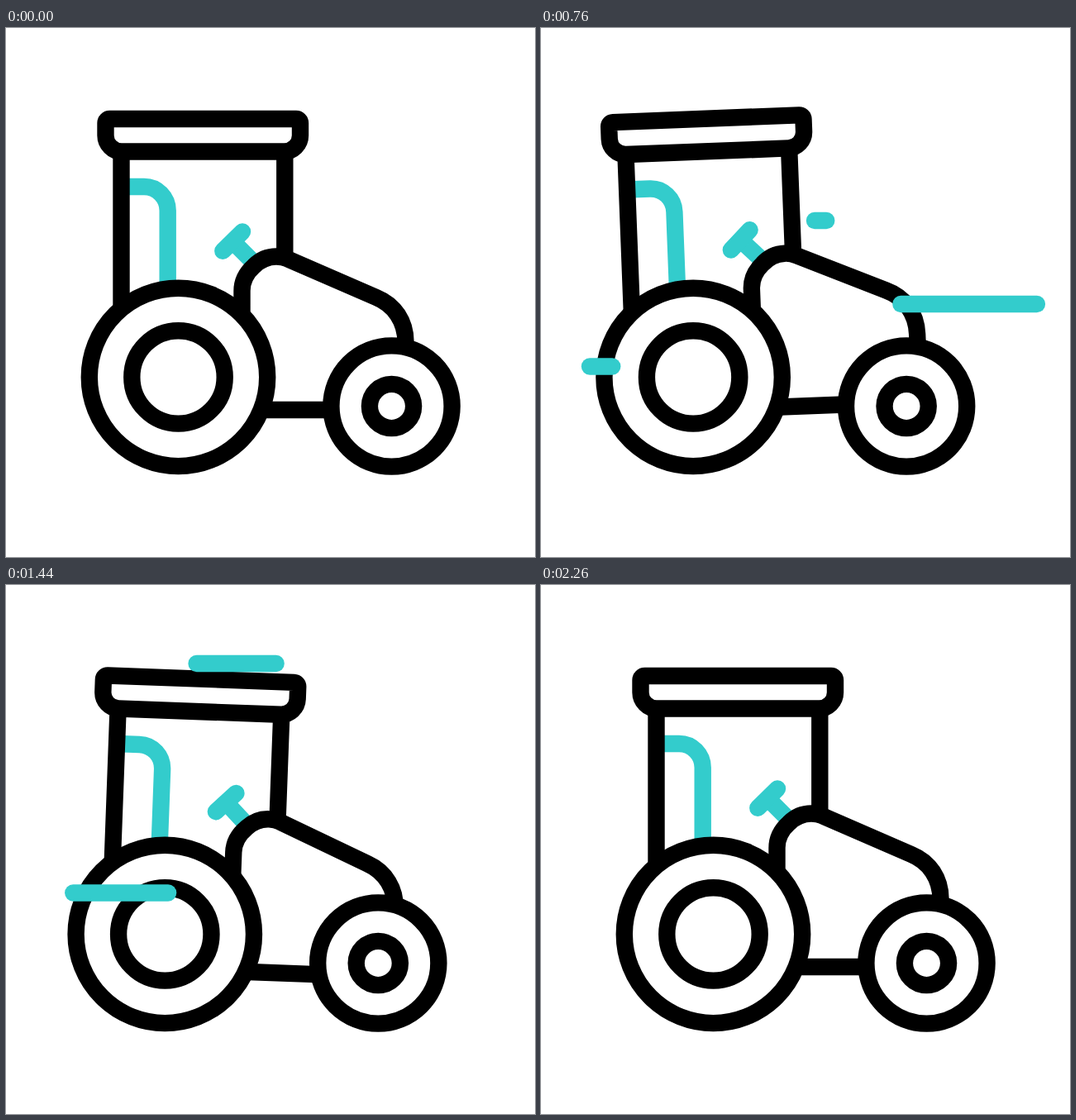
Write an HTML page that moves like this. It is 640 px wide and 640 px high and loops after 2400 ms.

```html
<!DOCTYPE html>
<html lang="en">
<head>
<meta charset="utf-8">
<title>Tractor</title>
<style>
  html, body { margin: 0; width: 100%; height: 100%; overflow: hidden; background: #fff; }
  svg { display: block; width: 100%; height: 100%; }
  .ink { fill: none; stroke: #000; stroke-width: 20.4; }
  .teal { fill: none; stroke: #33cccc; stroke-width: 20.4; }
  .round { stroke-linecap: round; }
  .wheel { fill: #fff; stroke: #000; stroke-width: 20.4; }
</style>
</head>
<body>
<svg viewBox="0 0 640 640" xmlns="http://www.w3.org/2000/svg">
  <rect width="640" height="640" fill="#fff"/>
  <g id="body">
    <path class="teal" d="M140 192H167C183 192 195.7 205 195.7 221V330"/>
    <path class="teal" d="M274 258L298 282"/>
    <path class="teal round" d="M262.3 269.8L286 246.5"/>
    <path class="ink" d="M139.5 150V345M337.3 150V279M295 462H405"/>
    <path class="ink" d="M285.5 356V318C285.5 305 291 296 300 288C308 280 318 276.5 327 276.5C332 276.5 337 277.5 341 279.5L448 326C470 335 483.5 355 483.5 380V402"/>
    <path class="ink" d="M125.5 110H351a5 5 0 0 1 5 5V130a19.5 19.5 0 0 1-19.5 19.5H140A19.5 19.5 0 0 1 120.5 130V115a5 5 0 0 1 5-5Z"/>
  </g>
  <g id="wheels">
    <circle class="wheel" cx="208.5" cy="422.4" r="107.7"/>
    <circle class="wheel" cx="208.5" cy="422.4" r="56.2"/>
    <circle class="wheel" cx="466.5" cy="457.5" r="73.1"/>
    <circle class="wheel" cx="466.5" cy="457.5" r="26.6"/>
  </g>
  <g id="wind"></g>
</svg>
<script>
  const LOOP = 2400, SWEEP = 540;
  const body = document.getElementById('body');
  const wheels = document.getElementById('wheels');
  const wind = document.getElementById('wind');

  // keys: [time, value]
  const driveKeys = [[0, 0], [585, -45], [1105, 32.5], [1635, -37.5], [2150, 0]];
  const bounceKeys = [[0, 0], [450, 11], [900, -8], [1380, 7], [1880, -7], [2260, 0]];
  const tiltKeys = [[0, 0], [615, -2.5], [1635, 2.6], [2150, 0]];

  // streaks: y, start x, end x, head start, tail start
  const streaks = [
    [233, 577, 331, 40, 300],
    [334, 612, 363.5, 413, 689],
    [409.5, 278, 59, 101, 340],
    [95, 470.5, 230.5, 907, 1135],
    [372.5, 281, 70.5, 975, 1206]
  ].map(([y, from, to, head, tail]) => {
    const el = document.createElementNS('http://www.w3.org/2000/svg', 'path');
    el.setAttribute('class', 'teal round');
    wind.appendChild(el);
    return { el, y, from, to, head, tail };
  });

  function ease(p) {
    p = Math.min(1, Math.max(0, p));
    return p * p * (3 - 2 * p);
  }

  function valueAt(keys, t) {
    for (let i = 1; i < keys.length; i++) {
      const [t0, a] = keys[i - 1], [t1, b] = keys[i];
      if (t < t1) return a + (b - a) * ease((t - t0) / (t1 - t0));
    }
    return keys[keys.length - 1][1];
  }

  function draw(t) {
    const dx = valueAt(driveKeys, t), dy = valueAt(bounceKeys, t);
    wheels.setAttribute('transform', `translate(${dx} 0)`);
    body.setAttribute('transform',
      `translate(${dx} ${dy}) rotate(${valueAt(tiltKeys, t)} 320 480)`);
    for (const s of streaks) {
      const at = start => s.from + (s.to - s.from) * ease((t - start) / SWEEP);
      const shown = t > s.head && t < s.tail + SWEEP;
      s.el.setAttribute('visibility', shown ? 'visible' : 'hidden');
      s.el.setAttribute('d', `M${at(s.tail)} ${s.y}H${at(s.head) - 0.01}`);
    }
  }

  const start = performance.now();
  function tick(now) {
    draw(Math.max(0, now - start) % LOOP);
    requestAnimationFrame(tick);
  }
  draw(0);
  requestAnimationFrame(tick);
</script>
</body>
</html>
```
